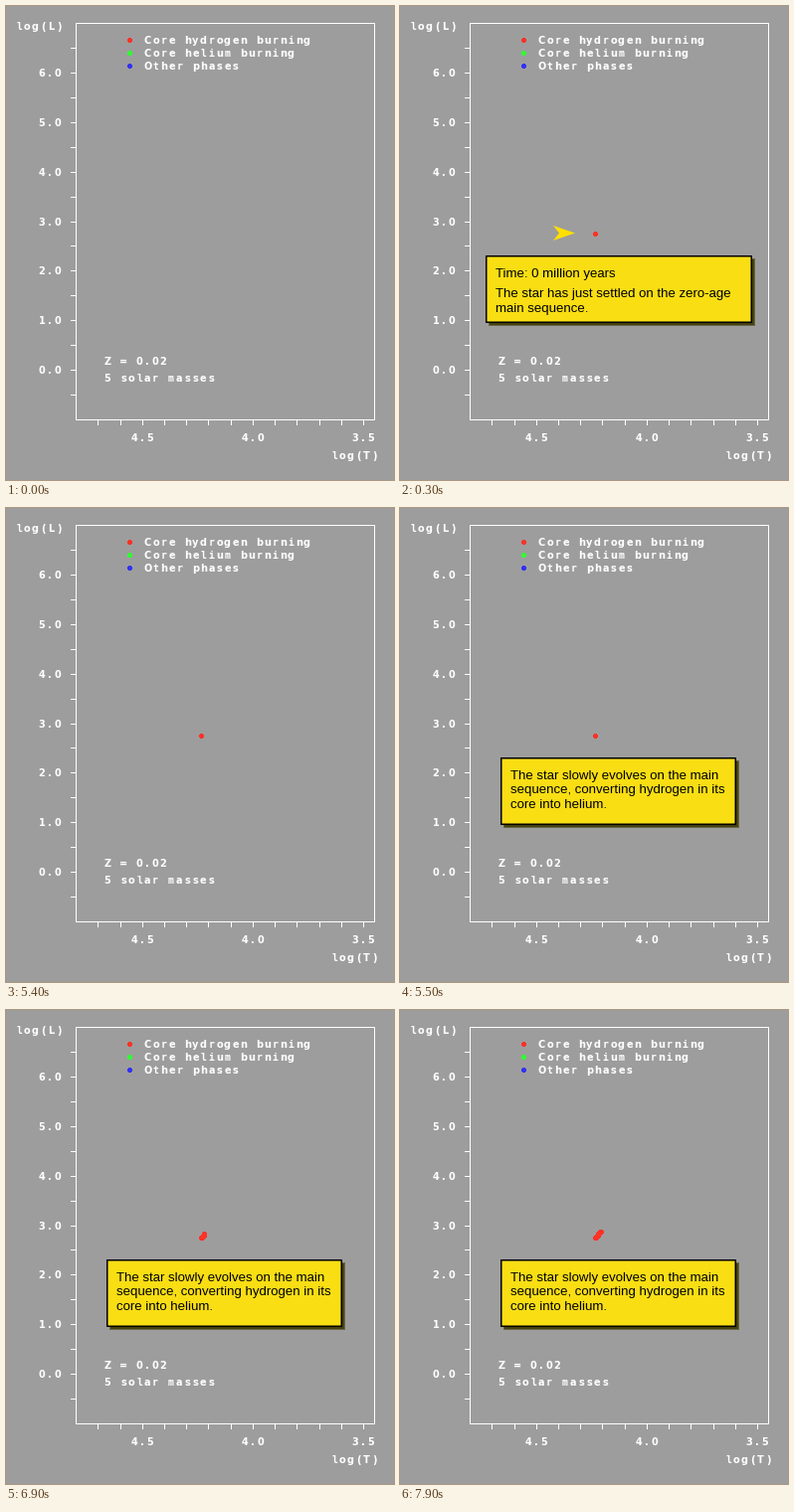
A matplotlib script that plays this animation: 390x477 px, repeating every 8 s.

```python
import matplotlib.pyplot as plt
from matplotlib.animation import FuncAnimation
from matplotlib.patches import Polygon, Rectangle

WIDTH, HEIGHT, DPI = 390, 477, 96
INTERVAL, LOOP = 100, 8000
PT = 72 / DPI
CELL = 8

GREY, WHITE, BLACK = "#9d9d9d", "#ffffff", "#000000"
RED, GREEN, BLUE = "#ff3228", "#32ff32", "#3232ff"
NOTE, ARROW, SHADOW = "#f9de14", "#ffe000", "#464210"

LEFT, RIGHT, TOP, BOTTOM = 70, 370, 17, 416
STAR = (196, 229)
PATH = "RURURUURURUR"

fig = plt.figure(figsize=(WIDTH / DPI, HEIGHT / DPI), dpi=DPI, facecolor=GREY)
ax = fig.add_axes([0, 0, 1, 1])
ax.set_xlim(0, WIDTH)
ax.set_ylim(HEIGHT, 0)
ax.axis("off")


def rect(x0, y0, x1, y1, color, **style):
    return ax.add_patch(Rectangle((x0, y0), x1 - x0, y1 - y0, fc=color, lw=0, **style))


def dot(x, y, color):
    """Round 5-pixel marker centred on pixel (x, y)."""
    corners = []
    for sx, sy in ((-1, -1), (1, -1), (1, 1), (-1, 1)):
        trio = [(2.5 * sx, 1.5 * sy), (1.5 * sx, 1.5 * sy), (1.5 * sx, 2.5 * sy)]
        corners += trio if sx == sy else trio[::-1]
    points = [(x + 0.5 + dx, y + 0.5 + dy) for dx, dy in corners]
    return ax.add_patch(Polygon(points, fc=color, lw=0))


def terminal_text(x, baseline, text):
    """Bold characters, each centred in its own fixed-width cell."""
    for i, char in enumerate(text):
        family = "DejaVu Sans Mono" if char in "ilmrt" else "DejaVu Sans"
        ax.text(x + CELL * (i + 0.5), baseline, char, family=family,
                weight="bold", size=9.7 * PT, color=WHITE, ha="center",
                va="baseline")


def note(x0, x1, lines):
    """Yellow box with a soft shadow; lines are (baseline, text) pairs."""
    y0, y1, border, drop = 251, 319, 1.5, 3
    parts = [
        rect(x0 + drop, y0 + drop, x1 + drop, y1 + drop, SHADOW, alpha=0.6),
        rect(x0 + drop + 1, y0 + drop + 1, x1 + drop - 1, y1 + drop - 1, SHADOW),
        rect(x0, y0, x1, y1, BLACK),
        rect(x0 + border, y0 + border, x1 - border, y1 - border, NOTE, snap=False),
    ]
    for baseline, text in lines:
        parts.append(ax.text(x0 + 10, baseline, text, family="Liberation Sans",
                             size=13.2 * PT, color=BLACK, va="baseline"))
    return parts


def draw_chart():
    rect(LEFT, TOP, RIGHT + 1, TOP + 1, WHITE)
    rect(LEFT, BOTTOM, RIGHT + 1, BOTTOM + 1, WHITE)
    rect(LEFT, TOP, LEFT + 1, BOTTOM + 1, WHITE)
    rect(RIGHT, TOP, RIGHT + 1, BOTTOM + 1, WHITE)

    unit = (BOTTOM - TOP) / 8
    for half in range(1, 16):
        y = int(TOP + half * unit / 2 + 0.5)
        rect(LEFT - 5, y, LEFT, y + 1, WHITE)
        if half % 2 == 0:
            terminal_text(32, y + 4, f"{7 - half / 2:.1f}")

    for tenth in range(1, 14):
        x = round(LEFT + 0.1 + tenth * 300 / 13.5)
        rect(x, BOTTOM + 1, x + 1, BOTTOM + 6, WHITE)
        if tenth % 5 == 3:
            terminal_text(x - 12, 438, f"{4.8 - tenth / 10:.1f}")

    terminal_text(9, 24, "log(L)")
    terminal_text(326, 456, "log(T)")
    terminal_text(98, 361, "Z = 0.02")
    terminal_text(98, 378, "5 solar masses")

    legend = (("Core hydrogen burning", RED), ("Core helium burning", GREEN),
              ("Other phases", BLUE))
    for row, (label, color) in enumerate(legend):
        y = 34 + 13 * row
        dot(124, y, color)
        terminal_text(138.5, y + 4, label)


def draw_trail():
    x, y = STAR
    dots = [dot(x, y, RED)]
    for move in PATH:
        if move == "R":
            x += 1
        else:
            y -= 1
        dots.append(dot(x, y, RED))
    return dots


draw_chart()
trail = draw_trail()
arrow = ax.add_patch(Polygon([(154, 221), (176, 228.5), (154, 236), (160, 228.5)],
                             fc=ARROW, lw=0))
birth_note = note(86, 354, [
    (273, "Time: 0 million years"),
    (293, "The star has just settled on the zero-age"),
    (308, "main sequence."),
])
evolve_note = note(101, 338, [
    (273, "The star slowly evolves on the main"),
    (287, "sequence, converting hydrogen in its"),
    (302, "core into helium."),
])


def show(parts, visible):
    for part in parts:
        part.set_visible(visible)


def update(frame):
    t = frame * INTERVAL
    steps = max(0, (t - 5500) // 200)
    for i, marker in enumerate(trail):
        marker.set_visible(t >= 100 and i <= steps)
    arrow.set_visible(200 <= t < 5400)
    show(birth_note, 300 <= t < 5300)
    show(evolve_note, t >= 5500)
    return []


anim = FuncAnimation(fig, update, frames=LOOP // INTERVAL, interval=INTERVAL,
                     repeat=True, repeat_delay=0, blit=False)
plt.show()
```
